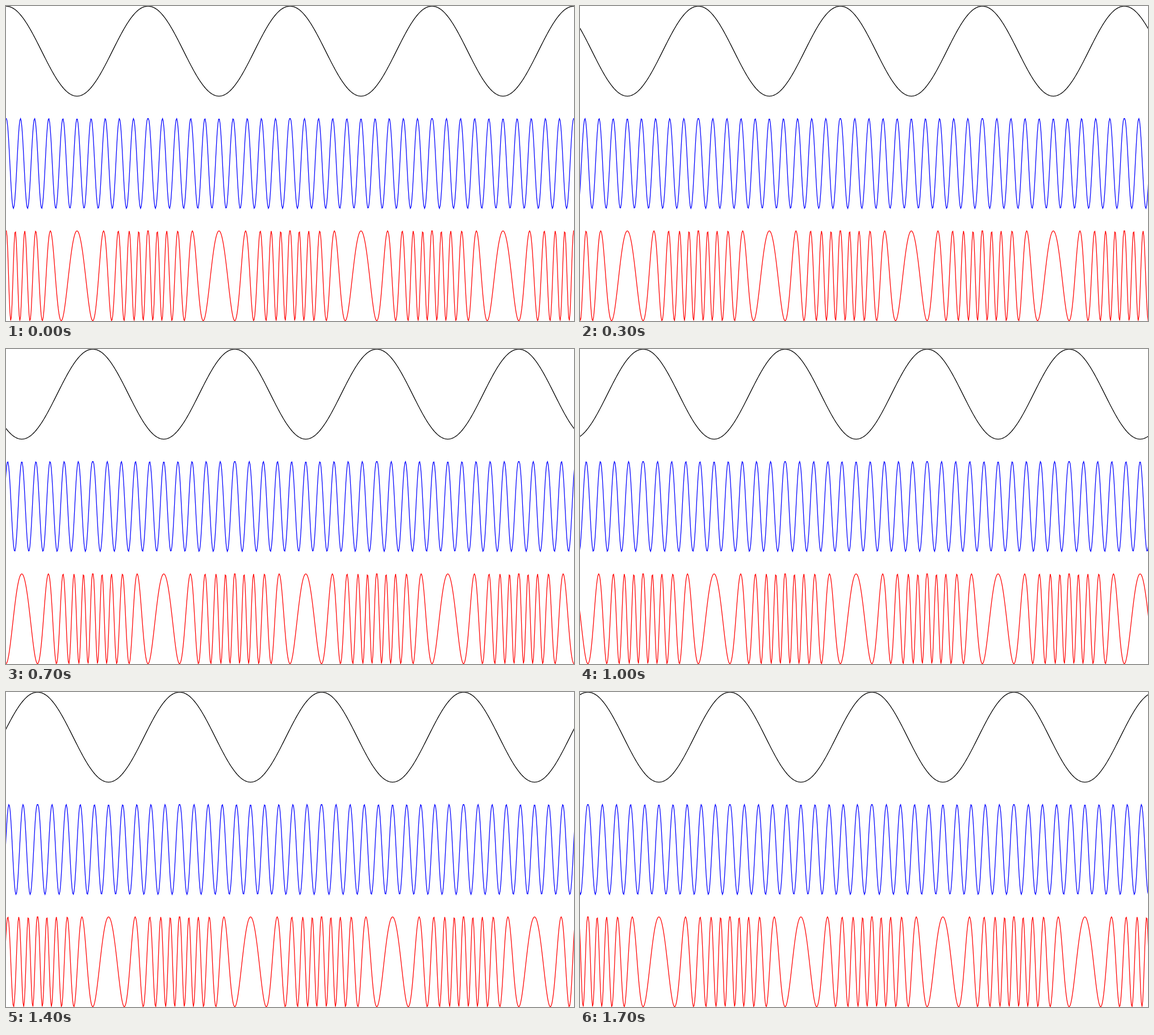
Write an HTML page that moves like this. It is 1000x556 px and loops after 1.8 s.

```html
<!DOCTYPE html>
<html lang="en">
<head>
<meta charset="utf-8">
<title>Frequency modulation</title>
<style>
  html, body { margin: 0; width: 100%; height: 100%; overflow: hidden; background: #fff; }
  svg { display: block; width: 1000px; height: 556px; }
  path { fill: none; stroke-width: 1.25; }
</style>
</head>
<body>
<svg viewBox="0 0 1000 556">
  <g id="waves">
    <path id="signal" stroke="#000"/>
    <path id="carrier" stroke="#00f"/>
    <path id="modulated" stroke="#f00"/>
  </g>
</svg>
<script>
const TILE = 250, SAMPLES = 200, TILES = 5;
const AMP = 79.3;
const LOOP = 1800, STEP = 100;

// Each tile samples one full turn, both ends included.
function wave(mid, phase) {
  const pts = [];
  for (let i = -SAMPLES; i < SAMPLES * TILES; i++) {
    const k = (i + SAMPLES) % SAMPLES;
    const a = 2 * Math.PI * k / (SAMPLES - 1);
    const x = (i + 0.5) * TILE / SAMPLES;
    const y = mid - AMP * Math.cos(phase(a));
    pts.push(x.toFixed(3) + "," + y.toFixed(3));
  }
  return "M" + pts.join("L");
}

function plot(id, mid, phase) {
  document.getElementById(id).setAttribute("d", wave(mid, phase));
}

plot("signal", 79.75, a => a);
plot("carrier", 278, a => 10 * a);
plot("modulated", 476.25, a => 10 * a + 6 * Math.sin(a));

const waves = document.getElementById("waves");

function draw(ms) {
  const t = Math.floor((ms % LOOP) / STEP) * STEP;
  waves.setAttribute("transform", `translate(${-TILE * t / LOOP} 0)`);
}

const start = performance.now();
function tick() {
  draw(performance.now() - start);
  requestAnimationFrame(tick);
}
tick();
</script>
</body>
</html>
```
